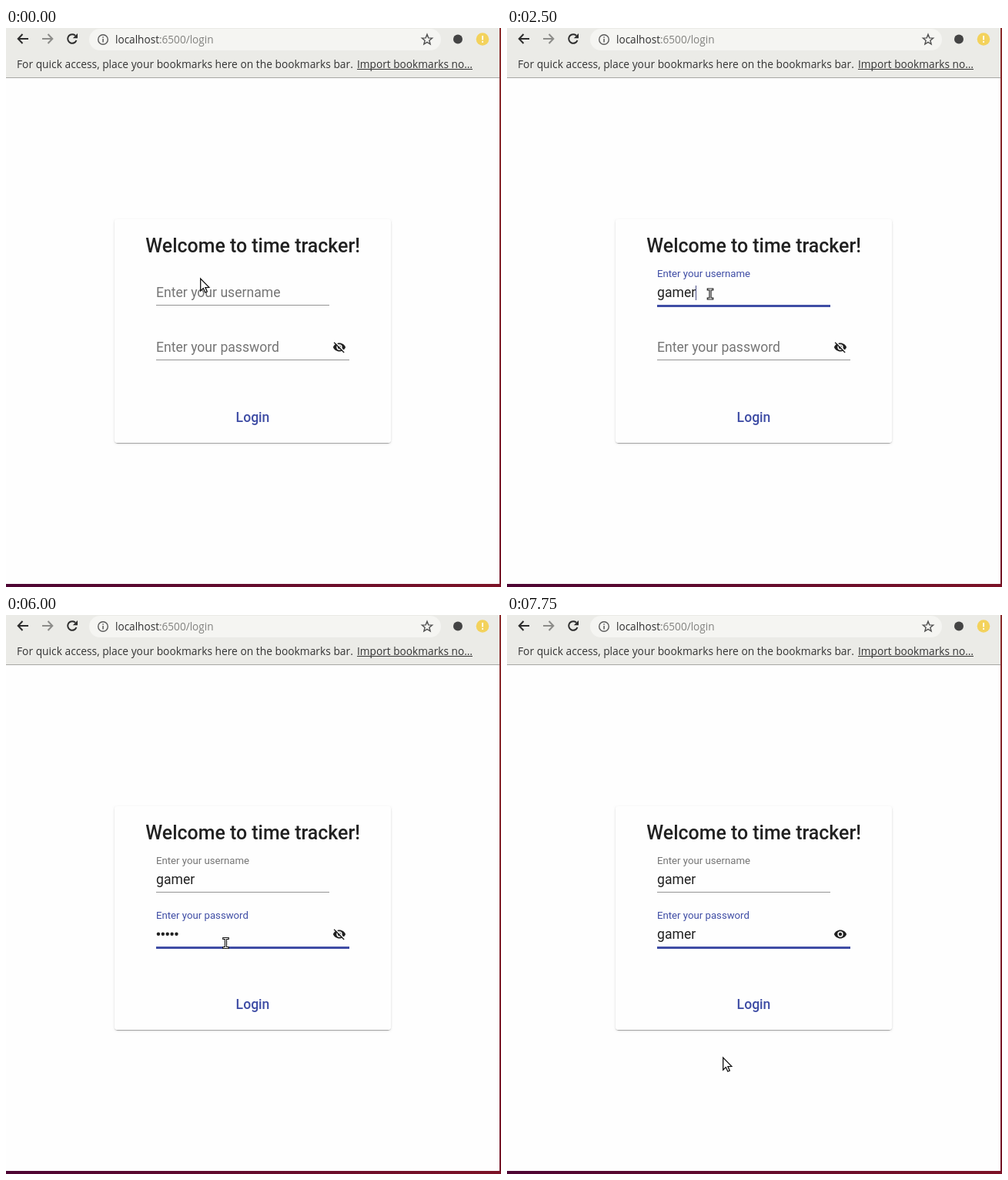
Animation, 643 px wide and 725 px high, one loop 8 s. Source, as an HTML page with a canvas:

```html
<!DOCTYPE html>
<html lang="en">
<head>
<meta charset="utf-8">
<title>Login form</title>
<style>
  html, body { margin: 0; width: 100%; height: 100%; overflow: hidden; background: #fefefe; }
  canvas { display: block; }
</style>
</head>
<body>
<canvas id="stage" width="643" height="725"></canvas>
<script>
const ctx = document.getElementById('stage').getContext('2d');
const LOOP = 8000;
const WORD = 'gamer';
const PAPER = '#fefefe', INK = '#212121', BLUE = '#3f4da5', HINT = '#757575', LINE = '#949494';
const UI = '"Open Sans", sans-serif', BODY = 'Roboto, sans-serif';
const TEXT_SIZE = 17.6, LEFT = 195, DOT_PITCH = 5.88;

// Each step changes part of the state and holds until the next one.
// up: label raised (1 = fully); bar: inset of the blue underline, null when unfocused.
const steps = [
  [0, { pointer: ['arrow', 252, 324], typed: 0, dots: 0, caret: '', shown: false, ripple: false,
        user: { up: 0, bar: null }, pass: { up: 0, bar: null } }],
  [250, { pointer: ['beam', 259, 338.5] }],
  [750, { pointer: ['beam', 263, 343.5], caret: 'user', user: { up: 0.9, bar: 3 } }],
  [1000, { pointer: ['beam', 264, 345], user: { up: 1, bar: 0 } }],
  [1250, { caret: '' }],
  [1750, { caret: 'user', typed: 1 }],
  [2000, { typed: 2 }],
  [2250, { typed: 4 }],
  [2500, { typed: 5 }],
  [3250, { caret: '' }],
  [3500, { pointer: ['arrow', 251, 351] }],
  [3750, { pointer: ['beam', 269, 418], caret: 'pass',
           user: { up: 1, bar: null }, pass: { up: 0.81, bar: 6 } }],
  [4000, { pass: { up: 1, bar: 0 } }],
  [4500, { dots: 2 }],
  [4750, { dots: 3 }],
  [5000, { dots: 4 }],
  [5250, { dots: 5 }],
  [6000, { pointer: ['beam', 285.5, 425.5], caret: '' }],
  [6250, { pointer: ['arrow', 494, 429] }],
  [6500, { pointer: ['hand', 424, 412], pass: { up: 1, bar: null } }],
  [6750, { shown: true, ripple: true, pass: { up: 1, bar: 2 } }],
  [7000, { pass: { up: 1, bar: 0 } }],
  [7250, { pointer: ['beam', 221.5, 419.5], ripple: false }],
  [7500, { pointer: ['arrow', 215, 317] }],
  [7750, { pointer: ['arrow', 280, 573] }],
];

function stateAt(time) {
  return Object.assign({}, ...steps.filter(([start]) => start <= time).map(([, change]) => change));
}

function rect(color, x, y, w, h) {
  ctx.fillStyle = color;
  ctx.fillRect(x, y, w, h);
}

function text(string, x, y, size, color, family = BODY, weight = 400, align = 'left') {
  ctx.font = `${weight} ${size}px ${family}`;
  ctx.textAlign = align;
  ctx.fillStyle = color;
  ctx.fillText(string, x, y);
}

function disc(color, x, y, r) {
  ctx.fillStyle = color;
  ctx.beginPath();
  ctx.arc(x, y, r, 0, Math.PI * 2);
  ctx.fill();
}

function trace(points, closed) {
  ctx.beginPath();
  points.forEach(([x, y]) => ctx.lineTo(x, y));
  if (closed) ctx.closePath();
}

function stroke(color, width) {
  ctx.strokeStyle = color;
  ctx.lineWidth = width;
  ctx.stroke();
}

function navArrow(x, dir, color) {
  trace([[x - 7 * dir, 14], [x + 6 * dir, 14]]);
  stroke(color, 2);
  trace([[x + 0.5 * dir, 8], [x + 6.3 * dir, 14], [x + 0.5 * dir, 20]]);
  stroke(color, 2);
}

function reloadIcon() {
  ctx.beginPath();
  ctx.arc(86, 14, 5.8, 0.35, Math.PI * 1.75);
  stroke('#2d2d2d', 2);
  trace([[93, 7], [93, 13.2], [86.8, 13.2]], true);
  ctx.fillStyle = '#2d2d2d';
  ctx.fill();
}

function starIcon() {
  const points = Array.from({ length: 10 }, (_, i) => {
    const r = i % 2 ? 3 : 7, a = i * Math.PI / 5 - Math.PI / 2;
    return [547 + r * Math.cos(a), 15.3 + r * Math.sin(a)];
  });
  trace(points, true);
  stroke('#505050', 1.4);
}

function toolbar() {
  rect('#ebebe7', 0, 0, 641, 64);
  rect('#a7a8a4', 0, 64, 641, 1);
  ctx.fillStyle = '#f5f5f2';
  ctx.beginPath();
  ctx.roundRect(108, 1, 457, 28, 14);
  ctx.fill();

  navArrow(22, -1, '#2d2d2d');
  navArrow(54, 1, '#8c8c89');
  reloadIcon();
  ctx.beginPath();
  ctx.arc(126, 15, 6.3, 0, Math.PI * 2);
  stroke('#5a5a5a', 1.4);
  rect('#5a5a5a', 125.3, 14, 1.5, 4.5);
  rect('#5a5a5a', 125.3, 11.3, 1.5, 1.5);
  starIcon();
  disc('#444444', 587, 14.5, 6);
  disc('#f3d25c', 619, 14.5, 8.3);
  rect('#ffffff', 618.2, 10, 1.8, 5.5);
  rect('#ffffff', 618.2, 17, 1.8, 1.9);

  text('localhost', 142, 20, 13.6, '#2e2e2e', UI);
  const hostWidth = ctx.measureText('localhost').width;
  text(':6500/login', 142 + hostWidth, 20, 13.6, '#82827f', UI);
  text('For quick access, place your bookmarks here on the bookmarks bar.', 14, 52, 13.8, '#333333', UI);
  text('Import bookmarks no…', 456, 52, 13.7, '#333333', UI);
  rect('#333333', 456, 53, 150, 1);
}

function desktopEdge() {
  const side = ctx.createLinearGradient(0, 0, 0, 725);
  side.addColorStop(0, '#8c2c2c');
  side.addColorStop(1, '#741226');
  rect(side, 641, 0, 2, 725);
  const base = ctx.createLinearGradient(0, 0, 643, 0);
  base.addColorStop(0, '#4d0533');
  base.addColorStop(1, '#7c1226');
  rect(base, 0, 721, 643, 4);
}

function card() {
  const shadows = [[2, 1, 1, 0.2], [1, 1, 0, 0.14], [1, 3, 0, 0.12]];
  ctx.save();
  for (const [dy, blur, inset, alpha] of shadows) {
    ctx.shadowColor = `rgba(0,0,0,${alpha})`;
    ctx.shadowBlur = blur;
    ctx.shadowOffsetY = dy;
    ctx.fillStyle = PAPER;
    ctx.beginPath();
    ctx.roundRect(141 + inset, 248 + inset, 359 - 2 * inset, 290 - 2 * inset, 4);
    ctx.fill();
  }
  ctx.restore();
  ctx.fillStyle = PAPER;
  ctx.beginPath();
  ctx.roundRect(141, 248, 359, 290, 4);
  ctx.fill();
  text('Welcome to time tracker!', 320.6, 291, 24.9, INK, BODY, 500, 'center');
  text('Login', 320.5, 511, TEXT_SIZE, BLUE, BODY, 500, 'center');
}

function field(label, baseline, width, { up, bar }) {
  const focused = bar !== null;
  const size = TEXT_SIZE * (1 - 0.25 * up);
  text(label, LEFT, baseline - 26 * up, size, focused ? BLUE : HINT);
  rect(LINE, LEFT, baseline + 10, width, 1);
  if (focused) rect(BLUE, LEFT + bar, baseline + 10, width - 2 * bar, 3);
}

function eye(open) {
  ctx.save();
  ctx.translate(433, 414);
  ctx.scale(0.733, 0.733);
  ctx.beginPath();
  ctx.moveTo(-11, 0);
  for (const s of [1, -1]) {
    ctx.bezierCurveTo(-9.3 * s, -4.4 * s, -5 * s, -7.5 * s, 0, -7.5 * s);
    ctx.bezierCurveTo(5 * s, -7.5 * s, 9.3 * s, -4.4 * s, 11 * s, 0);
  }
  ctx.closePath();
  ctx.moveTo(5, 0);
  ctx.arc(0, 0, 5, 0, Math.PI * 2);
  ctx.fillStyle = INK;
  ctx.fill('evenodd');
  disc(INK, 0, 0, 3);
  if (!open) {
    trace([[-8, -9.6], [9.8, 8.2]]);
    stroke(PAPER, 1.9);
    trace([[-9.4, -8.4], [8.4, 9.4]]);
    stroke(INK, 1.9);
  }
  ctx.restore();
}

const pointers = {
  arrow() {
    trace([[0.7, 1], [0.7, 17], [4.3, 13.6], [6.8, 19], [9.3, 18], [6.9, 12.6], [11.8, 12.4]], true);
    ctx.fillStyle = '#ffffff';
    ctx.fill();
    stroke('#111111', 1.3);
  },
  beam() {
    for (const [color, width] of [['#111111', 3.2], ['#ffffff', 1]]) {
      ctx.beginPath();
      for (const y of [-6, 6]) {
        ctx.moveTo(-2.7, y);
        ctx.lineTo(2.7, y);
      }
      ctx.moveTo(0, -6);
      ctx.lineTo(0, 6);
      ctx.lineCap = 'square';
      stroke(color, width);
      ctx.lineCap = 'butt';
    }
  },
  hand() {
    trace([[4.8, 11], [4.8, 1.5], [6, 0.7], [7.4, 1.5], [7.4, 6], [13.5, 7], [15.8, 8.6], [15.8, 13],
           [14.6, 17.4], [4, 17.4], [0.8, 11.4], [1.4, 9.6], [2.8, 9.4]], true);
    ctx.lineJoin = 'round';
    ctx.fillStyle = '#ffffff';
    ctx.fill();
    stroke('#111111', 1.4);
    ctx.lineJoin = 'miter';
    for (const x of [6, 9, 12]) rect('#444444', x, 12, 1, 2);
  },
};

function drawPointer([kind, x, y]) {
  ctx.save();
  ctx.translate(x, y);
  pointers[kind]();
  ctx.restore();
}

function draw(state) {
  rect(PAPER, 0, 0, 643, 725);
  toolbar();
  desktopEdge();
  card();
  field('Enter your username', 349, 225, state.user);
  field('Enter your password', 420, 251, state.pass);

  const name = WORD.slice(0, state.typed);
  text(name, LEFT, 349, TEXT_SIZE, INK);
  const nameWidth = ctx.measureText(name).width;
  if (state.shown) {
    text(WORD, LEFT, 420, TEXT_SIZE, INK);
  } else {
    for (let i = 0; i < state.dots; i++) disc(INK, LEFT + DOT_PITCH * (i + 0.5), 413.7, 2.2);
  }

  if (state.caret === 'user') rect('#4a5088', Math.round(LEFT + nameWidth), 334, 1, 19);
  if (state.caret === 'pass') rect('#4a5088', Math.round(LEFT + DOT_PITCH * state.dots), 405, 1, 19);

  if (state.ripple) disc('rgba(0,0,0,0.1)', 433, 415, 13);
  eye(state.shown);
  drawPointer(state.pointer);
}

function tick() {
  draw(stateAt(performance.now() % LOOP));
  requestAnimationFrame(tick);
}
tick();
</script>
</body>
</html>
```
